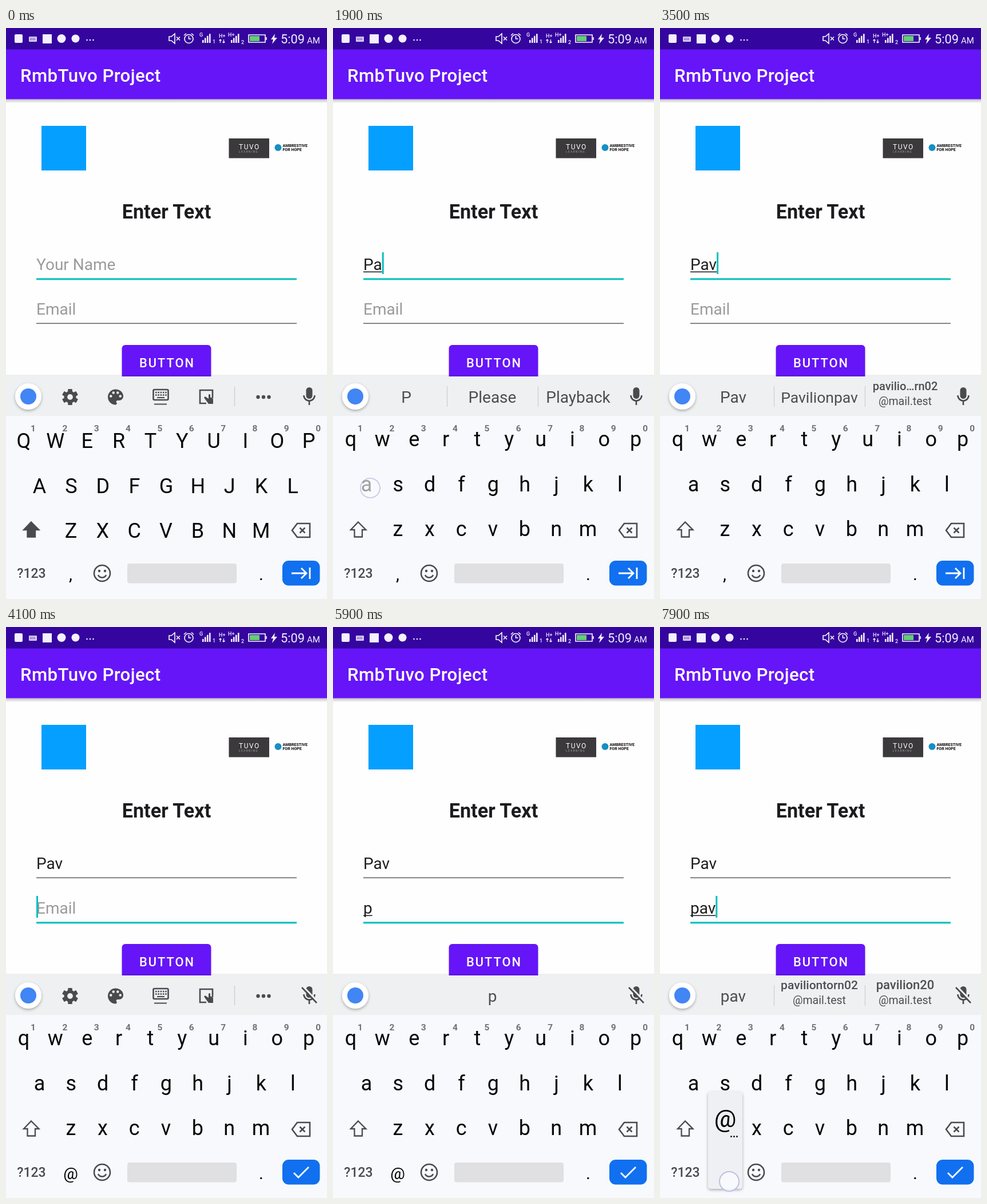
Write an HTML page that moves like this. It is 561x998 px and loops after 8 s.

```html
<!DOCTYPE html>
<html lang="en">
<head>
<meta charset="utf-8">
<title>Form typing</title>
<style>
  html, body { margin: 0; width: 100%; height: 100%; overflow: hidden; background: #fefefe; }
  svg { display: block; width: 100%; height: 100%; font-family: Roboto, sans-serif; }
  text { white-space: pre; }
  .mid { text-anchor: middle; }
  .med { font-weight: 500; }
  .field { font-size: 28px; fill: #1f1f21; }
  .hint { fill: #9b9b9d; }
  .key { font-size: 36px; fill: #060607; }
  .digit { font-size: 15.5px; font-weight: 700; fill: #707276; }
  .word { fill: #4b4e52; }
  .line { fill: none; stroke: #4a4b4e; stroke-width: 2.6; }
  .white { fill: none; stroke: #fff; stroke-width: 1.6; }
  .icon { fill: #4a4b4e; }
</style>
</head>
<body>
<svg viewBox="0 0 561 998" preserveAspectRatio="none">
  <defs>
    <filter id="drop" x="-30%" y="-30%" width="160%" height="160%">
      <feDropShadow dx="0" dy="2" stdDeviation="2.5" flood-opacity=".32"/>
    </filter>
    <linearGradient id="shade" x2="0" y2="1">
      <stop offset="0" stop-color="#000" stop-opacity=".24"/>
      <stop offset="1" stop-color="#000" stop-opacity="0"/>
    </linearGradient>
  </defs>

  <!-- page -->
  <rect width="561" height="998" fill="#fefefe"/>
  <rect y="124.500" width="561" height="7" fill="url(#shade)"/>
  <rect y="37" width="561" height="87.500" fill="#6515f7"/>
  <rect width="561" height="37.500" fill="#35059f"/>
  <text x="25" y="94" class="med" font-size="31.2" letter-spacing=".4" fill="#fff">RmbTuvo Project</text>
  <rect x="62" y="171" width="78" height="78" fill="#049fff"/>
  <rect x="389.500" y="193" width="70.500" height="34.500" fill="#3b393b"/>
  <text x="407" y="212" font-size="12" letter-spacing="1.500" fill="#fff">TUVO</text>
  <text x="407" y="218" font-size="4.5" letter-spacing="1.6" fill="#aaa">LEARNING</text>
  <circle cx="475.500" cy="209" r="6" fill="#158fc4"/>
  <g font-size="7" font-weight="900" fill="#222">
    <text x="483.500" y="208">AMBRESTIVE</text>
    <text x="483.500" y="214.500">FOR HOPE</text>
  </g>
  <text x="280.500" y="333" class="mid" font-size="34.200" font-weight="700" fill="#1c1c1f">Enter Text</text>

  <!-- status bar -->
  <g fill="#f4f0ff">
    <rect x="15" y="11" width="14" height="15" rx="2"/>
    <rect x="40" y="15" width="14" height="9" rx="1" opacity=".85"/>
    <path d="M42 18h10M42 20.500h10" stroke="#35059f" stroke-dasharray="1.500 1"/>
    <rect x="64" y="11" width="16" height="16"/>
    <circle cx="97" cy="18.500" r="7.500"/>
    <circle cx="121.500" cy="18.500" r="7"/>
    <circle cx="141.500" cy="21" r="1.300"/><circle cx="147" cy="21" r="1.300"/><circle cx="152.500" cy="21" r="1.300"/>
    <path class="white" d="M285 15h4l6-5v17l-6-5h-4zM298 15.500l6 6m0-6l-6 6"/>
    <circle class="white" cx="319.500" cy="19" r="7.500"/>
    <path class="white" d="M319.500 14v5h4M311 13l4-3.500M328 13l-4-3.500"/>
    <g id="bars"></g>
    <g font-size="9" font-weight="500">
      <text x="338" y="15">G</text><text x="361" y="27">1</text>
      <text x="372" y="17">H+</text><text x="388" y="15">H+</text><text x="411" y="28">2</text>
    </g>
    <path class="white" d="M374.500 26v-6m-2 2l2-2 2 2M380.500 20v6m-2-2l2 2 2-2" style="stroke-width:1.2"/>
    <path class="white" d="M424 12h29v13h-29zM455 16v5"/>
    <rect x="426" y="14" width="17" height="9" fill="#62cf72"/>
    <path d="M470 10l-7 10h4l-2 8 9-11h-5z"/>
    <text x="480" y="27" font-size="21.800">5:09</text>
    <text x="526" y="27" font-size="15">AM</text>
  </g>

  <!-- form -->
  <g id="fields"></g>
  <rect x="202.500" y="554" width="156" height="66" rx="6" fill="#6515f7"/>
  <text x="281.500" y="593" class="mid med" font-size="21.800" letter-spacing="2" fill="#fff">BUTTON</text>

  <!-- keyboard -->
  <rect y="606" width="561" height="4" fill="#000" opacity=".06"/>
  <rect y="609" width="561" height="70" fill="#eef0f2"/>
  <rect y="678" width="561" height="320" fill="#f7f9fc"/>
  <circle cx="39" cy="644" r="23" fill="#fff" filter="url(#drop)"/>
  <circle cx="39" cy="644" r="14" fill="#4285f4"/>
  <g id="tools">
    <g class="icon" transform="translate(112 645)">
      <g id="teeth"></g>
      <circle r="7.700" fill="none" stroke="#4a4b4e" stroke-width="5.600"/>
    </g>
    <g transform="translate(173.500 627) scale(1.500)">
      <path class="icon" d="M12 3c-4.970 0-9 4-9 9s4 9 9 9c.8 0 1.500-.7 1.500-1.500 0-.4-.15-.7-.4-1-.2-.3-.4-.6-.4-1 0-.8.7-1.500 1.500-1.500H16c2.800 0 5-2.200 5-5 0-4.400-4-8-9-8z"/>
      <g fill="#eef0f2">
        <circle cx="6.500" cy="11" r="1.500"/><circle cx="9.500" cy="7" r="1.500"/>
        <circle cx="14.500" cy="7" r="1.500"/><circle cx="17.500" cy="11" r="1.500"/>
      </g>
    </g>
    <g class="line">
      <rect x="257.500" y="632" width="26" height="18" rx="2"/>
      <path d="M261 637h20M261 641.500h20" stroke-dasharray="2.600 1.700"/>
      <path d="M264 646h13M259 657.500h22" stroke-width="2"/>
      <path d="M350 656h-11v-23h22v14"/>
    </g>
    <path class="icon" d="M346 646l2-2 6 4v-7q1.500-2 3 0v4l5 3v9h-8z"/>
    <path d="M399.500 627v34" stroke="#cfd1d5" stroke-width="1.500"/>
    <g class="icon"><circle cx="440.500" cy="645" r="3.200"/><circle cx="450" cy="645" r="3.200"/><circle cx="459.500" cy="645" r="3.200"/></g>
  </g>
  <g id="words"></g>
  <rect class="icon" x="524.500" y="628" width="11" height="20" rx="5.500"/>
  <path class="line" d="M520.500 642a9.500 9.500 0 0 0 19 0M530 652v7"/>
  <g id="micOff">
    <path d="M519 628l26 27" stroke="#eef0f2" stroke-width="3"/>
    <path class="line" d="M517 630l26 27"/>
  </g>
  <g id="keys"></g>
  <path id="shift" d="M44 863.500L57.500 877H51v12.500H37.500V877H31z" stroke="#4a4b4e" stroke-width="2.300"/>
  <path class="line" d="M509 866h22v24h-22l-9-12zM513.500 873.500l9 9m0-9l-9 9"/>
  <text x="44.500" y="961" class="mid med" font-size="23" fill="#4a4b4e">?123</text>
  <text id="mark" x="113" y="965" class="mid"></text>
  <circle class="line" cx="168" cy="953" r="14"/>
  <g class="icon"><circle cx="163" cy="949" r="2.200"/><circle cx="173" cy="949" r="2.200"/></g>
  <path class="line" d="M161 956q2 4.500 7 4.500t7-4.500"/>
  <rect x="212" y="936" width="191" height="34.500" rx="4" fill="#e0dfe2"/>
  <text x="446" y="965" class="mid" font-size="30">.</text>
  <rect x="483" y="931" width="65.500" height="43.500" rx="11" fill="#1170ef"/>
  <path id="enter" fill="none" stroke="#fff" stroke-width="2.800"/>

  <!-- pressed key and finger -->
  <g id="pop">
    <rect id="popBox" width="60" height="175" rx="5" fill="#eef0f3" filter="url(#drop)"/>
    <text id="popChar" x="30" y="62" class="mid" font-size="43"></text>
    <g fill="#111"><circle cx="40.500" cy="78.500" r="1.500"/><circle cx="45.500" cy="78.500" r="1.500"/><circle cx="50.500" cy="78.500" r="1.500"/></g>
  </g>
  <circle id="touch" r="17" fill="#fbfbfe" fill-opacity=".85" stroke="#bcc1e2" stroke-width="2"/>
</svg>
<script>
const $ = id => document.getElementById(id);
const text = (x, y, cls, str, extra = '') => `<text x="${x}" y="${y}" class="${cls}" ${extra}>${str}</text>`;
const rect = (x, y, w, h, fill) => `<rect x="${x}" y="${y}" width="${w}" height="${h}" fill="${fill}"/>`;

const LOOP = 8000, STEP = 55.35, TEAL = '#08c0bf';
const rows = [
  { chars: 'qwertyuiop', x: 31, base: 731 },
  { chars: 'asdfghjkl', x: 58.5, base: 809.5 },
  { chars: 'zxcvbnm', x: 113.5, base: 888 }
];

// A key's preview: character, left edge, top edge, height
const preview = (ch, col, row) => [ch, rows[row].x + STEP * col - 30.5, 576 + 78.5 * row, 175];
const host = '@mail.test';

const steps = [
  [0, { name: '', mail: '', focus: 0, caps: true, caret: false, composing: true, mailKeys: false, words: null, pop: null, touch: null }],
  [500, { pop: preview('P', 9, 0), touch: [536, 734, 1] }],
  [600, { name: 'P', caps: false, caret: true, pop: null, touch: [536, 734, .7] }],
  [700, { words: ['P', 'Please', 'Playback'], touch: [536, 734, .35] }],
  [800, { touch: null }],
  [1100, { caret: false }],
  [1600, { caret: true }],
  [1800, { pop: preview('a', 0, 1), touch: [65, 804, 1] }],
  [1900, { name: 'Pa', pop: null, touch: [65, 804, .75] }],
  [2000, { words: ['Pa', 'Part', 'Pay'], touch: [65, 804, .35] }],
  [2100, { touch: null }],
  [2400, { pop: preview('v', 3, 2), touch: [293, 878, 1] }],
  [2500, { name: 'Pav', pop: null, touch: [293, 878, .5], words: ['Pav', ['Pavilionpav', 26.5], ['pavilio…rn02', 20, host]] }],
  [2600, { touch: [293, 878, .25] }],
  [2700, { touch: null }],
  [3000, { caret: false }],
  [3500, { caret: true }],
  [3900, { focus: 1, composing: false, touch: [520, 955, 1] }],
  [4000, { words: null, mailKeys: true, touch: [520, 955, .5] }],
  [4100, { touch: null }],
  [4400, { caret: false }],
  [4900, { caret: true }],
  [5300, { pop: preview('p', 9, 0), touch: [536, 734, 1] }],
  [5400, { mail: 'p', composing: true, pop: null, touch: [536, 734, .7] }],
  [5500, { words: [null, 'p'], touch: [536, 734, .35] }],
  [5600, { touch: null }],
  [5900, { caret: false }],
  [6100, { pop: preview('a', 0, 1), touch: [65, 804, 1] }],
  [6300, { mail: 'pa', caret: true, pop: null, words: [null, 'pa'], touch: [65, 804, .5] }],
  [6400, { touch: null }],
  [6600, { pop: preview('v', 3, 2), touch: [304, 882, 1] }],
  [6800, { mail: 'pav', pop: null, words: ['pav', ['paviliontorn02', 21, host], ['pavilion20', 22, host]], touch: [304, 882, .5] }],
  [6900, { touch: null }],
  [7300, { caret: false }],
  [7800, { caret: true }],
  [7900, { pop: ['@', 84, 812, 170], touch: [121, 969, 1] }]
];

let last = {};
const states = steps.map(([at, change]) => (last = { ...last, ...change, at }));

function drawField(value, hint, top, s, index) {
  const active = s.focus === index, lineY = top + 46;
  const probe = $('mark');
  probe.textContent = value;
  probe.style.fontSize = '28px';
  const width = value ? probe.getComputedTextLength() : 0;
  let out = text(53, top + 31, value ? 'field' : 'field hint', value || hint);
  out += active ? rect(53, lineY - .7, 455, 3.1, TEAL) : rect(53, lineY - .5, 455, 1.6, '#68686b');
  if (active && s.composing && value) out += rect(53, top + 33.5, width, 1.6, '#1f1f21');
  if (active && s.caret) out += rect(53 + width, top, 3, 38, TEAL);
  return out;
}

function drawWords(words) {
  let out = words[0] ? rect(198.8, 626, 1.4, 36, '#cfd1d5') + rect(357.8, 626, 1.4, 36, '#cfd1d5') : '';
  words.forEach((word, i) => {
    if (!word) return;
    const x = [128, 278.5, 428.5][i];
    const [label, size, sub] = [].concat(word);
    out += text(x, sub ? 633 : 655, sub ? 'mid word med' : 'mid word', label, `font-size="${size || 28}"`);
    if (sub) out += text(x, 659, 'mid word', sub, 'font-size="19.5"');
  });
  return out;
}

function drawKeys(caps) {
  return rows.map((row, r) => [...row.chars].map((ch, i) => {
    const x = row.x + STEP * i;
    const digit = r ? '' : text(x + 16.5, 705, 'mid digit', (i + 1) % 10);
    return text(x, row.base + (caps ? 3 : 0), 'mid key', caps ? ch.toUpperCase() : ch) + digit;
  }).join('')).join('');
}

const show = (id, on) => { $(id).style.display = on ? '' : 'none'; };

function draw(s) {
  $('fields').innerHTML = drawField(s.name, 'Your Name', 392, s, 0) + drawField(s.mail, 'Email', 470, s, 1);
  $('keys').innerHTML = drawKeys(s.caps);
  $('shift').setAttribute('fill', s.caps ? '#4a4b4e' : 'none');
  $('mark').textContent = s.mailKeys ? '@' : ',';
  $('mark').style.fontSize = s.mailKeys ? '28.5px' : '30px';
  $('enter').setAttribute('d', s.mailKeys ? 'M503 954l8 8 18-18' : 'M499 953h26m-9-9l9 9-9 9M531 943v20');
  $('words').innerHTML = s.words ? drawWords(s.words) : '';
  show('tools', !s.words);
  show('micOff', s.mailKeys);
  show('pop', s.pop);
  show('touch', s.touch);
  if (s.pop) {
    const [ch, x, y, h] = s.pop;
    $('pop').setAttribute('transform', `translate(${x} ${y})`);
    $('popBox').setAttribute('height', h);
    $('popChar').textContent = ch;
  }
  if (s.touch) {
    const [x, y, alpha] = s.touch;
    $('touch').setAttribute('transform', `translate(${x} ${y})`);
    $('touch').setAttribute('opacity', alpha);
  }
}

$('bars').innerHTML = [343, 393].map(x =>
  [0, 1, 2, 3].map(i => rect(x + i * 4, 21 - i * 3.6, 2.6, 5 + i * 3.6, '#f4f0ff')).join('')).join('');
$('teeth').innerHTML = [0, 60, 120].map(a =>
  `<rect x="-3.8" y="-14" width="7.6" height="5" rx="1" transform="rotate(${a})"/>` +
  `<rect x="-3.8" y="9" width="7.6" height="5" rx="1" transform="rotate(${a})"/>`).join('');

let current = null;
function tick() {
  const t = performance.now() % LOOP;
  const s = states.findLast(state => state.at <= t);
  if (s !== current) draw(current = s);
  requestAnimationFrame(tick);
}
tick();
</script>
</body>
</html>
```
